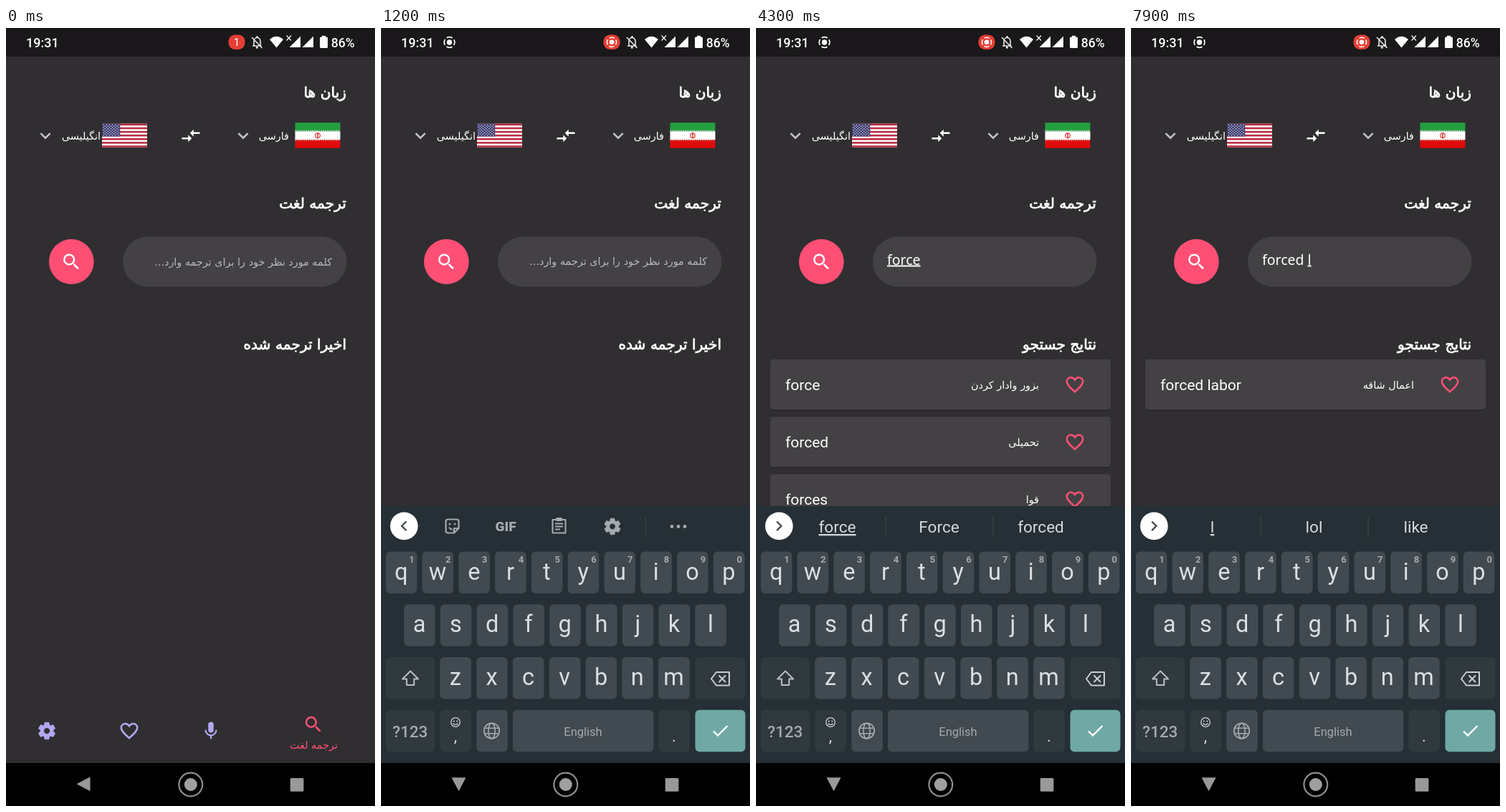
An HTML page that plays this animation: 515x1087 px, repeating every 8 s.

```html
<!DOCTYPE html>
<html lang="fa">
<head>
<meta charset="utf-8">
<title>Dictionary search</title>
<style>
html, body { margin: 0; width: 100%; height: 100%; overflow: hidden; background: #302e31; }
svg { display: block; width: 515px; height: 1087px; }
text { font-family: Roboto, sans-serif; fill: #fff; white-space: pre; }
.fa { font-family: "DejaVu Sans", sans-serif; font-size: 14.4px; direction: rtl; }
.title { font-size: 20.2px; stroke: #fff; stroke-width: .8px; }
.field { font-family: "Noto Sans", sans-serif; font-size: 19.5px; }
.mid { text-anchor: middle; }
.under { text-decoration: underline; text-decoration-thickness: 1.3px; text-underline-offset: 2px; }
</style>
</head>
<body>
<svg id="stage" viewBox="0 0 515 1087" xmlns="http://www.w3.org/2000/svg">
  <g id="page"></g>
  <g id="cards"></g>
  <g id="keyboard"></g>
  <g id="system"></g>
</svg>
<script>
const LOOP = 8000, FOCUS = 600, SLIDE = 800, SLIDE_TIME = 343, TURN_TIME = 315;
const PINK = '#ff4f75', LILAC = '#b3a7f0', KEY = '#414a50', KEY_DIM = '#2f393e', SOFT = '#a4abaf';
const byId = id => document.getElementById(id);

const rect = (x, y, w, h, fill, r = 0) =>
  `<rect x="${x}" y="${y}" width="${w}" height="${h}" rx="${r}" fill="${fill}"/>`;
const disc = (x, y, r, fill) => `<circle cx="${x}" cy="${y}" r="${r}" fill="${fill}"/>`;
const ring = (x, y, r, color, w, extra = '') =>
  `<circle cx="${x}" cy="${y}" r="${r}" fill="none" stroke="${color}" stroke-width="${w}" ${extra}/>`;
const label = (x, y, str, cls = '', extra = '') => `<text x="${x}" y="${y}" class="${cls}" ${extra}>${str}</text>`;
const sized = (size, fill, weight = 400) => `style="font-size:${size}px;fill:${fill};font-weight:${weight}"`;
const line = (d, color, w, extra = '') =>
  `<path d="${d}" fill="none" stroke="${color}" stroke-width="${w}" ${extra}/>`;
const shape = (d, fill) => `<path d="${d}" fill="${fill}" fill-rule="evenodd"/>`;
// Places a 24-unit icon with its centre at x, y.
const icon = (x, y, body, scale = 1.25) =>
  `<g transform="translate(${x} ${y}) scale(${scale}) translate(-12 -12)">${body}</g>`;

const search = color => line('M14.6 14.6L19.7 19.7', color, 2.1) + ring(9.5, 9.5, 5.5, color, 2);
const heart = color => line('M12 20C6 14.7 3 11.8 3 8.5C3 6 5 4 7.5 4C9.3 4 11 5 12 6.6C13 5 14.7 4 16.5 4C19 4 21 6 21 8.5C21 11.8 18 14.7 12 20Z', color, 2);
const mic = color => rect(9, 2, 6, 12, color, 3) + line('M6 11a6 6 0 0 0 12 0M12 17v4', color, 1.8);
const down = line('M6.7 9.3L12 14.6L17.3 9.3', '#c4c2c5', 2);
const swap = shape('M9 14H2v2h7v3l4-4l-4-4zM15 13v-3h7V8h-7V5l-4 4z', '#fff');

function gear(color) {
  const points = [];
  for (let i = 0; i < 6; i++)
    for (const [turn, r] of [[-23, 7.2], [-14, 9.7], [14, 9.7], [23, 7.2]]) {
      const a = (i * 60 + turn) * Math.PI / 180;
      points.push((12 + r * Math.sin(a)).toFixed(2) + ' ' + (12 - r * Math.cos(a)).toFixed(2));
    }
  return `<path d="M${points.join('L')}ZM8.5 12a3.5 3.5 0 1 0 7 0a3.5 3.5 0 1 0 -7 0" fill="${color}"
    fill-rule="evenodd" stroke="${color}" stroke-width=".6" stroke-linejoin="round"/>`;
}

function flagIran(x, y) {
  let out = rect(x, y, 63, 12, '#239f40') + rect(x, y + 12, 63, 12, '#fff') + rect(x, y + 24, 63, 11.5, '#e00b0b');
  for (const dy of [11.2, 24.6])
    out += line(`M${x} ${y + dy}h63`, '#fff', 1.3, 'stroke-dasharray="1.5 1.5" opacity=".7"');
  return out + ring(x + 31.5, y + 18, 3.3, '#e0605c', 1.5) + rect(x + 30.8, y + 13.8, 1.5, 8.4, '#d8322f');
}

function flagUsa(x, y) {
  const band = 33 / 13;
  let out = rect(x, y, 63, 33, '#fff');
  for (let i = 0; i < 13; i += 2) out += rect(x, y + i * band, 63, band, '#b92b42');
  out += rect(x, y, 25.2, band * 7, '#3c3b6e');
  for (let row = 0; row < 9; row++)
    for (let col = row % 2; col < 11; col += 2)
      out += disc(x + 2.1 + col * 2.1, y + 1.7 + row * 1.8, .75, '#e8e8f2');
  return out;
}

byId('page').innerHTML =
  rect(0, 0, 515, 1087, '#302e31') +
  label(475, 97, 'زبان ها', 'fa title') +
  flagIran(403.5, 132.3) + label(395, 156, 'فارسی', 'fa') + icon(331, 150.5, down) +
  icon(258, 150.5, swap) +
  flagUsa(134, 133.7) + label(132, 156, 'انگیلیسی', 'fa') + icon(55, 150.5, down) +
  label(475, 251.5, 'ترجمه لغت', 'fa title') +
  rect(163, 291.5, 312.5, 70, '#434144', 35) +
  disc(91.3, 326.5, 31.4, PINK) + icon(91.3, 326.7, search('#fff')) +
  label(455, 332, 'کلمه مورد نظر خود را برای ترجمه وارد...', 'fa', 'id="hint" style="fill:#b9b7ba"') +
  label(183, 330.5, '', 'field', 'id="typed"') +
  `<rect id="cursor" y="311" width="2.6" height="29.5" fill="#b487ee"/>` +
  label(475, 449, '', 'fa title', 'id="heading"') +
  icon(57, 982, gear(LILAC)) + icon(172, 982, heart(LILAC)) + icon(286, 982, mic(LILAC)) +
  icon(429, 973, search(PINK)) + label(463, 1007, 'ترجمه لغت', 'fa', `style="fill:${PINK}"`);

const card = ([word, meaning], i) => {
  const y = 463 + i * 80.2;
  return rect(20, y + 1.5, 475, 70, '#28262a', 4) + rect(20, y, 475, 70, '#434144', 4) +
    label(41, y + 43, word, '', sized(21, '#fff')) + label(395, y + 41, meaning, 'fa') +
    icon(445, y + 35.3, heart(PINK));
};

// Keyboard
const PITCH = 50.8;
const key = (x, y, w, fill = KEY) => rect(x, y, w, 58.5, fill, 6);
function letters(chars, x, y) {
  return [...chars].map((c, i) => key(x + i * PITCH, y, 43.6) +
    label(x + 21.5 + i * PITCH, y + 39, c, 'mid', sized(32.5, '#dbdfe2'))).join('');
}
const digits = [...'1234567890'].map((d, i) =>
  label(43 + i * PITCH, 746.5, d, 'mid', sized(13, SOFT, 700))).join('');

const toolbar =
  line('M108.5 699v-9.500q0-3-3-3h-12q-3 0-3 3v13q0 3 3 3h8.500zM102 705v-6h6.500', SOFT, 2.2, 'stroke-linejoin="round"') +
  disc(96, 693, 1.5, SOFT) + disc(103, 693, 1.5, SOFT) + line('M95 697.5q2 3.500 5 3', SOFT, 1.8) +
  label(174, 702.5, 'GIF', 'mid', sized(19, SOFT, 900)) +
  line('M239.500 687h18v18.500h-18zM243 692.500h11M243 696.500h11M243 700.500h7', SOFT, 2.1, 'stroke-linejoin="round"') +
  rect(244, 684, 9, 5, SOFT, 1.5) +
  icon(323, 696.5, gear(SOFT), 1.2) + rect(368.5, 683, 1, 27, '#3f484d') +
  [406, 415, 424].map(x => disc(x, 696.5, 2.4, SOFT)).join('');

const smile = ring(104, 970, 6.3, '#ced3d6', 1.3) + disc(101.8, 968.5, 1, '#ced3d6') +
  disc(106.2, 968.5, 1, '#ced3d6') + line('M100.500 971.500q3.500 4 7 0', '#ced3d6', 1.2);
const globe = ring(154.5, 982, 10.7, SOFT, 1.7) +
  `<ellipse cx="154.500" cy="982" rx="4.700" ry="10.700" fill="none" stroke="${SOFT}" stroke-width="1.600"/>` +
  line('M144.500 978.300h20M144.500 985.700h20', SOFT, 1.6);

byId('keyboard').innerHTML =
  rect(0, 668, 515, 840, '#252f35') +
  disc(32.2, 695.8, 19.4, '#fff') + line('', '#42494e', 2.3, 'id="chevron"') +
  `<g id="toolbar">${toolbar}</g><g id="suggestions"></g>` +
  letters('qwertyuiop', 6.7, 731.5) + digits +
  letters('asdfghjkl', 32, 805.3) +
  key(6.7, 879, 68.5, KEY_DIM) + letters('zxcvbnm', 82.3, 879) + key(438.5, 879, 70, KEY_DIM) +
  line('M41 898.500l11 11h-5.800v8.500h-10.400v-8.500h-5.800z', '#b9c0c4', 2, 'stroke-linejoin="round"') +
  line('M468 900h18v18.500h-18l-7-9.250zM471.500 904.500l9.500 9.500M481 904.500l-9.500 9.500', '#c9ced1', 2, 'stroke-linejoin="round"') +
  key(6.7, 952.8, 68.5, KEY_DIM) + label(40.7, 990.5, '?123', 'mid', sized(22.5, SOFT, 500)) +
  key(82.3, 952.8, 43.6, KEY_DIM) + smile + label(104, 997, ',', 'mid', sized(22, '#d5d9dc')) +
  key(133.2, 952.8, 43.6) + globe +
  key(184, 952.8, 196.5) + label(282, 988.5, 'English', 'mid', sized(16.5, SOFT)) +
  key(387.4, 952.8, 43.6, KEY_DIM) + label(409, 997, '.', 'mid', sized(22, '#d5d9dc')) +
  key(438.5, 952.8, 70, '#6fa8a4') + line('M464 982.500l6 6l13.500-13.500', '#fff', 2.4);

// Status and navigation bars
const record = (x, y, s) => ring(x, y, 7.3 * s, '#fff', 1.7 * s, `stroke-dasharray="${8.4 * s} ${3.07 * s}" stroke-dashoffset="${4.2 * s}"`) +
  disc(x, y, 3.7 * s, '#fff');
const bell = line('M344 25h12.500M346 25v-6.500a4.500 5 0 0 1 9 0v6.500M349 13.500l1.500-1.500l1.500 1.500M343 13l14.500 15', '#e8e8e8', 1.6) +
  disc(350.3, 27.3, 1.5, '#e8e8e8');

byId('system').innerHTML =
  rect(0, 0, 515, 40, '#1a181a') +
  label(28, 27.2, '19:31', '', sized(18, '#fff', 500)) +
  rect(310.5, 9.5, 23, 20.5, '#e53e35', 9) +
  `<g id="count">${label(322, 25.2, '1', 'mid', sized(15, '#fff'))}</g>` +
  `<g id="recording">${record(95.5, 20, 1)}${record(322, 19.8, .9)}</g>` + bell +
  shape('M368 16q9.500-8.500 19 0l-9.500 11.500z', '#fff') +
  line('M391.500 10.500l6.500 7M398 10.500l-6.500 7', '#fff', 1.2) +
  shape('M395.500 27h15.500v-15.500zM413.500 27h15.500v-15.500z', '#fff') +
  rect(438, 12.5, 11, 15.5, '#fff', 1.5) + rect(441, 10.8, 5, 3, '#fff') +
  label(453.7, 27.2, '86%', '', sized(17.6, '#fff', 500)) +
  `<g id="navBar">${rect(0, 1027, 515, 60, '#000')}</g>` +
  shape('M-10 0L9-10V10Z', '#999').replace('<path', '<path id="back"') +
  ring(257.8, 1057, 16.4, '#8e8e8e', 2.2) + disc(257.8, 1057, 9, '#a0a0a0') +
  rect(396.7, 1048, 18.7, 18.7, '#999', 1.5);

// Timeline: finished text, the part still being composed, and suggestions
const typing = [
  [FOCUS, '', '', null],
  [1400, '', 'f', ['f', 'for', 'from']],
  [1700, '', 'fo', ['fo', 'for', 'follow']],
  [1900, '', 'for', ['for', 'form', 'forward']],
  [2200, '', 'forc', ['forc', 'force', 'forced']],
  [2600, '', 'force', ['force', 'Force', 'forced']],
  [4600, '', 'forced', ['forced', 'forces', 'forcedly']],
  [7000, 'forced ', '', ['forced', 'forces', 'forcedly']],
  [7400, 'forced ', 'l', ['l', 'lol', 'like']]
];
const forced = ['forced', 'تحمیلی'], labor = ['forced labor', 'اعمال شاقه'];
const results = [
  [0, []],
  [3100, [['force', 'بزور وادار کردن'], forced, ['forces', 'قوا']]],
  [5100, [forced, labor]],
  [7900, [labor]]
];
const latest = (list, t) => list.filter(step => step[0] <= t).pop();
const show = (id, on) => byId(id).setAttribute('visibility', on ? 'visible' : 'hidden');
const clamp = v => Math.min(1, Math.max(0, v));
let lastStep, lastResult;

function showTyping([, done, composing, words]) {
  byId('typed').innerHTML = `<tspan>${done}</tspan><tspan class="under">${composing}</tspan>`;
  const width = done + composing ? byId('typed').getComputedTextLength() : 0;
  byId('cursor').setAttribute('x', 183.3 + width);
  show('hint', !words);
  byId('chevron').setAttribute('d', words ? 'M29 689.500l6.300 6.300l-6.300 6.300' : 'M35.300 689.500l-6.300 6.300l6.300 6.300');
  byId('suggestions').innerHTML = words ? rect(180.5, 682, 1, 29, '#3f484d') + rect(330.5, 682, 1, 29, '#3f484d') +
    words.map((word, i) => label(113.5 + i * 142, 705, word, i || !composing ? 'mid' : 'mid under', sized(22.6, '#d5dadd'))).join('') : '';
}

function showResults([, rows]) {
  byId('cards').innerHTML = rows.map(card).join('');
  byId('heading').textContent = rows.length ? 'نتایج جستجو' : 'اخیرا ترجمه شده';
}

function draw(t) {
  const focused = t >= FOCUS;
  const step = latest(typing, t) || typing[0], result = latest(results, t);
  if (step !== lastStep) showTyping(lastStep = step);
  if (result !== lastResult) showResults(lastResult = result);
  show('cursor', focused && Math.floor((t - step[0]) / 500) % 2 === 0);
  byId('hint').setAttribute('y', focused ? 331 : 332);
  show('count', t < 300);
  show('recording', t >= 300);

  const slide = clamp((t - SLIDE) / SLIDE_TIME);
  byId('keyboard').setAttribute('transform', `translate(0 ${420 * (1 - slide) ** 2})`);
  show('keyboard', t >= SLIDE);
  show('toolbar', t >= SLIDE && !step[3]);
  show('navBar', slide === 0 || slide === 1);
  byId('back').setAttribute('transform', `translate(108.500 1056.300) rotate(${270 * clamp((t - SLIDE) / TURN_TIME)})`);
}

const start = performance.now();
function tick() {
  draw((performance.now() - start + 10) % LOOP);
  requestAnimationFrame(tick);
}
tick();
</script>
</body>
</html>
```
